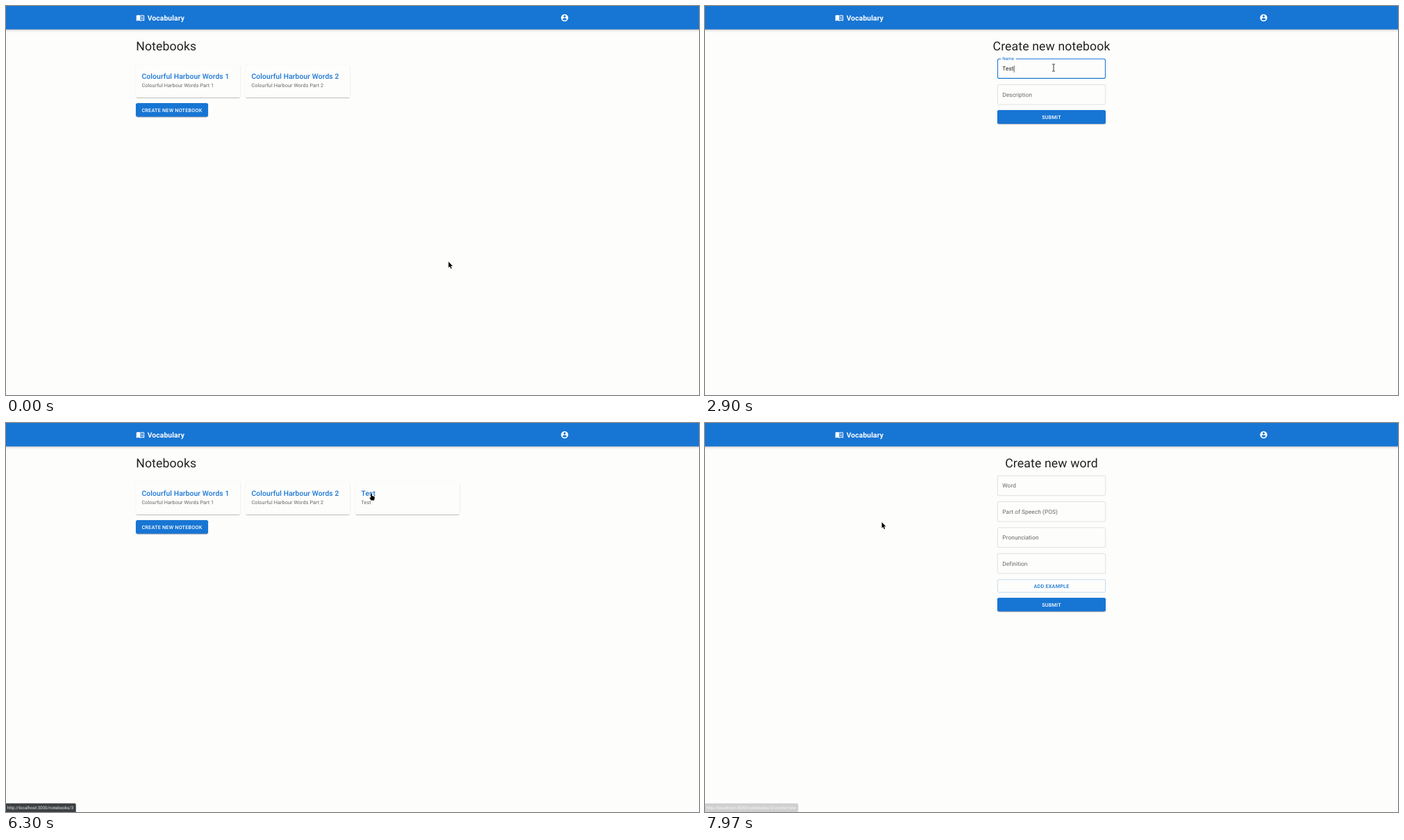
An HTML page with a canvas that plays this animation: 998 px wide and 561 px high, repeating every 8 s.

```html
<!DOCTYPE html>
<html lang="en">
<head>
<meta charset="utf-8">
<title>Vocabulary</title>
<style>
  html, body { margin: 0; width: 100%; height: 100%; overflow: hidden; background: #fdfdfc; }
  canvas { display: block; width: 998px; height: 561px; }
</style>
</head>
<body>
<canvas id="stage"></canvas>
<script>
const W = 998, H = 561, LOOP = 8000;
const U = W / 1920; // interface pixel size on the stage
const BLUE = '#1775d4', DARK = '#1568c6', PAPER = '#fdfdfc';
const INK = 'rgba(0,0,0,.87)', SOFT = 'rgba(0,0,0,.6)', LINE = 'rgba(0,0,0,.23)';

const canvas = document.getElementById('stage');
const dpr = window.devicePixelRatio || 1;
canvas.width = W * dpr;
canvas.height = H * dpr;
const c = canvas.getContext('2d');

const clamp = v => Math.max(0, Math.min(1, v));
const ramp = (t, from, to) => clamp((t - from) / (to - from));
const easeOut = p => 1 - (1 - p) ** 3;
const smooth = p => p * p * (3 - 2 * p);
const mix = (a, b, p) => a + (b - a) * p;

// ---- drawing helpers ----
function text(str, x, y, size, { weight = 400, color = INK, gap = 0, align = 'left' } = {}) {
  c.font = `${weight} ${size * U}px Roboto, sans-serif`;
  c.letterSpacing = gap * size * U + 'px';
  c.textAlign = align;
  c.fillStyle = color;
  c.fillText(str, x, y);
  return c.measureText(str).width;
}

function box(x, y, w, h, r) {
  c.beginPath();
  c.roundRect(x, y, w, h, r);
}

function shadowed(fill, layers) {
  c.fillStyle = fill;
  for (const [dy, blur, alpha] of layers) {
    c.shadowColor = `rgba(0,0,0,${alpha})`;
    c.shadowOffsetY = dy * U * dpr;
    c.shadowBlur = blur * U * dpr;
    c.fill();
  }
  c.shadowColor = 'transparent';
  c.fill();
}

function icon(x, y, size, draw) {
  c.save();
  c.translate(x, y);
  c.scale(size / 24, size / 24);
  c.fillStyle = '#fff';
  draw();
  c.restore();
}

const bookIcon = new Path2D(
  'M12 6C9 4 4 4 1 6V21C4 19.5 9 19.5 12 21.5C15 19.5 20 19.5 23 21V6C20 4 15 4 12 6Z' +
  'M12 8C15 6.3 18.5 6.2 21 7V18.5C18.5 17.7 15 17.9 12 19.5Z');

function drawBook() {
  c.fill(bookIcon, 'evenodd');
  c.fillRect(14, 9.4, 5.5, 1.3);
  c.fillRect(14, 12, 5.5, 1.3);
  c.fillRect(14, 14.7, 5.5, 1.3);
}

function drawAccount() {
  const disc = (x, y, r, color) => {
    c.fillStyle = color;
    c.beginPath();
    c.arc(x, y, r, 0, 7);
    c.fill();
  };
  disc(12, 12, 10, '#fff');
  disc(12, 8, 3, BLUE);
  c.fill(new Path2D('M6 16C6 14 10 12.9 12 12.9S18 14 18 16C15.5 20.2 8.5 20.2 6 16Z'));
}

function drawQuiz() {
  c.fill(new Path2D('M4 6H2V20Q2 22 4 22H18V20H4Z'));
  box(6, 2, 16, 16, 2);
  c.fill();
  c.fillStyle = BLUE;
  c.font = '700 13px Roboto, sans-serif';
  c.letterSpacing = '0px';
  c.textAlign = 'center';
  c.fillText('?', 14, 14.7);
}

// ---- interface parts ----
function appBar() {
  c.beginPath();
  c.rect(-10, -10, W + 20, 10 + 64 * U);
  shadowed(BLUE, [[2, 4, .2], [4, 5, .14], [1, 10, .12]]);
  icon(187.2, 10.6, 24 * U, drawBook);
  icon(804.5 - 12 * U, 17 - 12 * U, 24 * U, drawAccount);
  text('Vocabulary', 203.7, 20.8, 20, { weight: 700, color: '#fff', gap: .0075 });
}

const heading = (str, x = 187.2, align = 'left') =>
  text(str, x, 63.6, 34, { gap: .00735, align });

function button(label, x, y, w, { hover = 0, tx, ripple } = {}) {
  const h = 36.5 * U;
  box(x, y, w, h, 4 * U);
  shadowed(hover ? DARK : BLUE, hover
    ? [[2, 4, .2], [4, 5, .14], [1, 10, .12]]
    : [[3, 1, .1], [2, 2, .14], [1, 5, .12]]);
  if (ripple && ripple.p > 0 && ripple.p < 1) {
    c.save();
    c.clip();
    c.fillStyle = `rgba(255,255,255,${.3 * (1 - ripple.p)})`;
    c.beginPath();
    c.arc(ripple.x, ripple.y, w * easeOut(ripple.p), 0, 7);
    c.fill();
    c.restore();
  }
  const style = { weight: 500, color: '#fff', gap: .02857 };
  if (tx) text(label, tx, y + 12.2, 14, style);
  else text(label, x + w / 2, y + 12.2, 14, { ...style, align: 'center' });
}

function card(x, title, note) {
  box(x, 84.2, 150, 47.8, 4 * U);
  shadowed(PAPER, [[2, 1, .14], [1, 1, .14], [1, 3, .12]]);
  text(title, x + 8.3, 104.5, 20, { weight: 500, color: BLUE, gap: .0075 });
  text(note, x + 8.3, 117, 14, { color: SOFT, gap: .0107 });
}

function field(label, y, { value = '', focus = 0, lift = 0, caret = false } = {}) {
  const x = 421, w = 156, h = 56 * U, size = mix(16, 12, lift);
  const lw = (focus ? 2 : 1) * U;
  box(x + lw / 2, y + lw / 2, w - lw, h - lw, 4 * U);
  c.lineWidth = lw;
  c.strokeStyle = focus ? BLUE : LINE;
  c.stroke();
  if (lift) {
    c.font = `400 ${12 * U}px Roboto, sans-serif`;
    c.letterSpacing = '0px';
    const notch = (c.measureText(label).width + 5) * lift;
    c.fillStyle = PAPER;
    c.fillRect(x + 5.2, y - .5, notch, 2);
  }
  text(label, x + 7.3, mix(y + 17.5, y + 2.4, lift), size, { color: focus ? BLUE : SOFT, gap: .0094 });
  const end = value ? text(value, x + 7.3, y + 17.5, 16, { gap: .0094 }) : 0;
  if (caret) {
    c.fillStyle = INK;
    c.fillRect(x + 7.5 + end, y + 10, .7, 10);
  }
}

function statusBar(url, alpha) {
  if (alpha <= 0) return;
  c.font = `400 ${12 * U}px Roboto, sans-serif`;
  c.letterSpacing = '0px';
  const w = c.measureText(url).width + 5;
  c.fillStyle = `rgba(60,64,67,${alpha})`;
  box(-3, 548.6, w + 3, 16, 2);
  c.fill();
  const v = Math.round(mix(253, 232, alpha));
  text(url, 1.6, 557.4, 12, { color: `rgb(${v},${v},${v})` });
}

// ---- pages ----
function homePage(t, withTest) {
  heading('Notebooks');
  card(187.2, 'Colourful Harbour Words 1', 'Colourful Harbour Words Part 1');
  card(345.2, 'Colourful Harbour Words 2', 'Colourful Harbour Words Part 2');
  if (withTest) card(503.2, 'Test', 'Test');
  button('CREATE NEW NOTEBOOK', 187.2, 140.4, 103.8, {
    tx: 195.4, hover: t > 640 && t < 1060, ripple: { x: 250, y: 150, p: ramp(t, 860, 1360) }
  });
}

const FORM = [
  { label: 'Name', y: 75.8, on: 1900, off: 3050, keys: [2200, 2320, 2450, 2580] },
  { label: 'Description', y: 113.2, on: 3050, off: 4220, keys: [3330, 3430, 3550, 3670] }
];

function notebookForm(t) {
  heading('Create new notebook', 499, 'center');
  for (const { label, y, on, off, keys } of FORM) {
    const typed = keys.filter(k => t >= k).length;
    const focus = t >= on && t < off;
    const since = t - (typed ? keys[typed - 1] : on);
    field(label, y, {
      value: 'Test'.slice(0, typed),
      focus,
      lift: easeOut(ramp(t, on, on + 200)),
      caret: focus && since % 1000 < 500
    });
  }
  button('SUBMIT', 421, 150.6, 156, {
    hover: t > 3900, ripple: { x: 496, y: 163, p: ramp(t, 4220, 4600) }
  });
}

function testPage(t) {
  heading('Test');
  text('Test', 187.2, 83.2, 16, { color: SOFT, gap: .0094 });
  text('Number of words: 0', 187.2, 95.6, 16, { color: SOFT, gap: .0094 });
  button('CREATE TESTS', 187.2, 103, 81.4, { tx: 207.8 });
  icon(193.4, 107.2, 20 * U, drawQuiz);
  button('TESTS', 272.8, 103, 39.2, { tx: 281 });
  button('CREATE NEW WORD', 187.2, 130.2, 86.2, {
    tx: 195.4, hover: t > 7500, ripple: { x: 232, y: 140, p: ramp(t, 7680, 8180) }
  });
}

function wordForm() {
  heading('Create new word', 499, 'center');
  ['Word', 'Part of Speech (POS)', 'Pronunciation', 'Definition']
    .forEach((label, i) => field(label, 75.8 + i * 37.42, {}));
  box(421.3, 225.8, 155.4, 18.4, 4 * U);
  c.lineWidth = U;
  c.strokeStyle = 'rgba(25,118,210,.5)';
  c.stroke();
  text('ADD EXAMPLE', 499, 237.8, 14, { weight: 500, color: BLUE, gap: .02857, align: 'center' });
  button('SUBMIT', 421, 252.4, 156);
}

// ---- pointer ----
const TRACK = [
  [30, 637.3, 368.8], [720, 250, 149], [960, 250, 149], [1430, 496, 103.8],
  [1620, 502, 89], [2910, 502, 89], [3040, 500, 126], [3740, 500, 126],
  [4000, 488.6, 167.8], [4080, 488.6, 167.8], [4200, 496.4, 164.5], [5560, 496.4, 164.5],
  [5980, 524, 110], [6130, 524, 110], [6220, 526.2, 101.3], [6960, 526.2, 101.3],
  [7570, 232, 139], [7790, 232, 139], [7970, 254.6, 143]
];

function pointerAt(t) {
  const i = TRACK.findIndex(k => k[0] > t);
  if (i === 0) return TRACK[0].slice(1);
  if (i < 0) return TRACK[TRACK.length - 1].slice(1);
  const [t0, x0, y0] = TRACK[i - 1], [t1, x1, y1] = TRACK[i];
  const p = smooth(ramp(t, t0, t1));
  return [mix(x0, x1, p), mix(y0, y1, p)];
}

const within = (t, ...spans) => spans.some(([a, b]) => t >= a && t < b);
const arrow = new Path2D('M0 0V8.5L1.9 6.8L3.3 10L4.7 9.4L3.3 6.3H5.8Z');
const hand = new Path2D(
  'M-.8 .6Q0 -.5 .8 .6V3.8L4 4.6Q4.9 5 4.7 6.2L4 10.2H-.4L-2.4 7.2Q-3 6 -1.8 6L-.8 6.8Z');

function pointer(t) {
  const [x, y] = pointerAt(t);
  c.save();
  c.translate(x, y);
  if (within(t, [1530, 3800])) {
    c.strokeStyle = '#222';
    c.lineWidth = .9;
    c.stroke(new Path2D('M-2 -5H-.6L0 -4.5L.6 -5H2M0 -4.5V4.5M-2 5H-.6L0 4.5L.6 5H2'));
  } else {
    const shape = within(t, [640, 1060], [3900, 4650], [6150, 6600], [7500, 7800]) ? hand : arrow;
    c.lineJoin = 'round';
    c.lineWidth = 1;
    c.strokeStyle = '#fff';
    c.stroke(shape);
    c.fillStyle = '#000';
    c.fill(shape);
  }
  c.restore();
}

// ---- timeline ----
const LINKS = [
  ['new', 640, 1060, 1300],
  ['3', 6150, 6560, 6790],
  ['3/words/new', 7500, 7800, 8027]
];

function render(t) {
  c.setTransform(dpr, 0, 0, dpr, 0, 0);
  c.textRendering = 'geometricPrecision';
  c.fillStyle = PAPER;
  c.fillRect(0, 0, W, H);
  if (t < 1530) homePage(t, false);
  else if (t < 4650) notebookForm(t);
  else if (t < 6600) homePage(t, true);
  else if (t < 7800) testPage(t);
  else wordForm();
  appBar();
  for (const [path, on, off, gone] of LINKS) {
    statusBar('http://localhost:3000/notebooks/' + path,
      Math.min(ramp(t, on, on + 120), 1 - ramp(t, off, gone)));
  }
  pointer(t);
}

const start = performance.now();
function tick() {
  render((performance.now() - start) % LOOP);
  requestAnimationFrame(tick);
}
tick();
</script>
</body>
</html>
```
